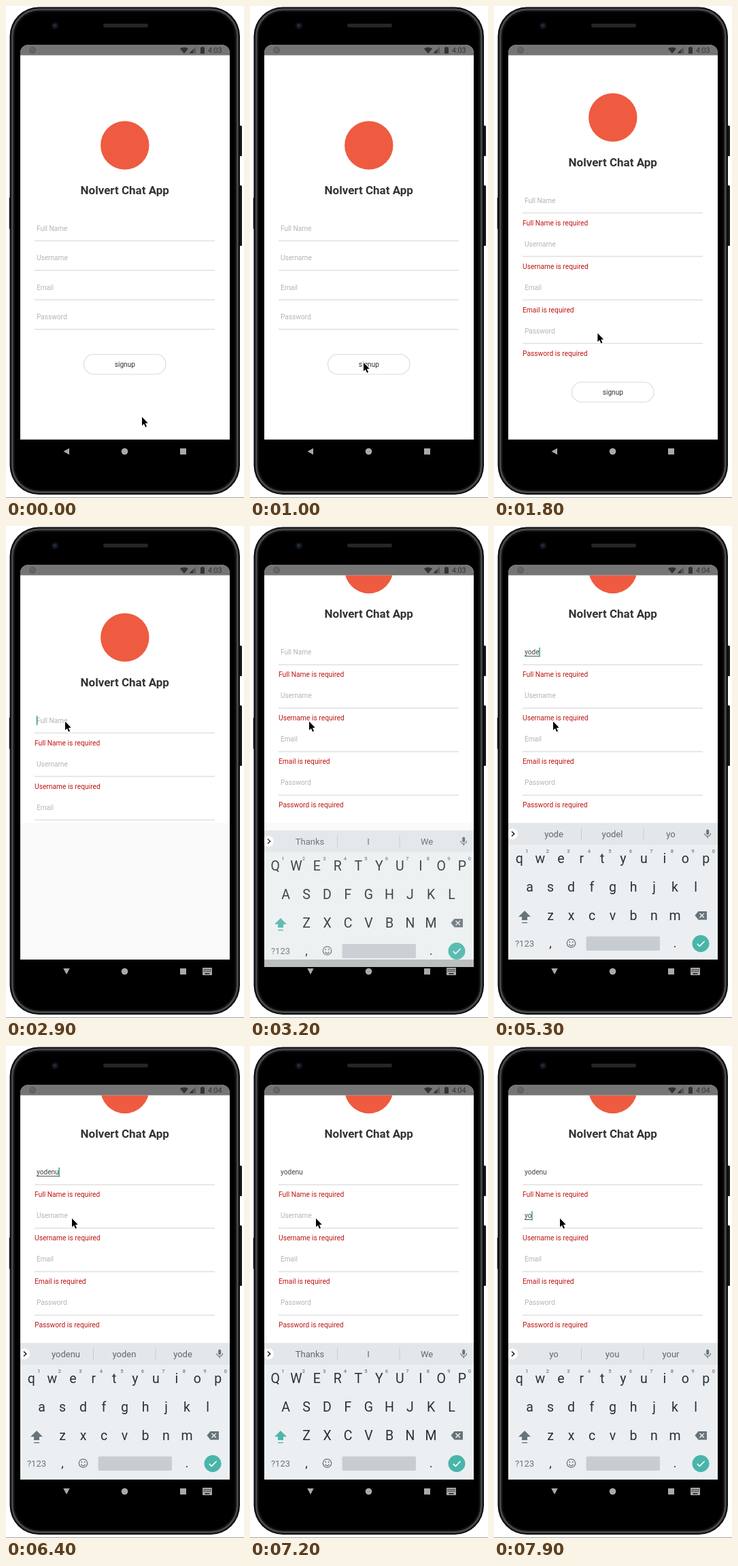
An HTML page with a canvas that plays this animation: 350 px wide and 724 px high, repeating every 8 s.

```html
<!DOCTYPE html>
<html lang="en">
<head>
<meta charset="utf-8">
<title>Sign-up form</title>
<style>
html, body { margin: 0; width: 100%; height: 100%; overflow: hidden; background: #fff; }
canvas { display: block; width: 350px; height: 724px; }
</style>
</head>
<body>
<canvas id="stage"></canvas>
<script>
const W = 350, H = 724, LOOP = 8000, STEP = 100;
const canvas = document.getElementById('stage');
const ratio = window.devicePixelRatio || 1;
canvas.width = W * ratio;
canvas.height = H * ratio;
const c = canvas.getContext('2d');
const FONT = 'Roboto, sans-serif';

const ERRORS_AT = 1200, FOCUS_AT = 2700, RESIZE_AT = 2900, NEXT_AT = 6600;
const BAR_END = 72.5;
const LABELS = ['Full Name', 'Username', 'Email', 'Password'];
const KEYS = ['qwertyuiop', 'asdfghjkl', 'zxcvbnm'];
const EMPTY = ['Thanks', 'I', 'We'];

// Each key press: time, field, value, suggestions
const TYPING = [
  [3800, 0, 'y', ['y', 'you', 'your']],
  [4000, 0, 'yo', ['yo', 'you', 'your']],
  [4700, 0, 'yod', ['yod', 'yo', 'you']],
  [5100, 0, 'yode', ['yode', 'yodel', 'yo']],
  [5500, 0, 'yoden', ['yoden', 'yodel', 'yode']],
  [5950, 0, 'yodenu', ['yodenu', 'yoden', 'yode']],
  [7400, 1, 'y', ['y', 'you', 'your']],
  [7700, 1, 'yo', ['yo', 'you', 'your']]
];

// Pointer path: time, x, y
const POINTER = [
  [0, 200, 604], [600, 167, 524], [1500, 167, 524],
  [2600, 87, 287], [5900, 87, 287], [6300, 97, 253]
];

const clamp = (v) => Math.max(0, Math.min(1, v));
const ramp = (t, a, b) => clamp((t - a) / (b - a));
const ease = (p) => p * p * (3 - 2 * p);

function text(str, x, y, size, color, align = 'left', weight = 400) {
  c.font = `${weight} ${size}px ${FONT}`;
  c.textAlign = align;
  c.fillStyle = color;
  c.fillText(str, x, y);
}

function rect(x, y, w, h, color) {
  c.fillStyle = color;
  c.fillRect(x, y, w, h);
}

function pill(x, y, w, h, r, fill, stroke, width = 1) {
  c.beginPath();
  c.roundRect(x, y, w, h, r);
  if (fill) { c.fillStyle = fill; c.fill(); }
  if (stroke) { c.strokeStyle = stroke; c.lineWidth = width; c.stroke(); }
}

function disc(x, y, r, color) {
  c.beginPath();
  c.arc(x, y, r, 0, Math.PI * 2);
  c.fillStyle = color;
  c.fill();
}

function trace(points) {
  c.beginPath();
  points.forEach(([x, y], i) => i ? c.lineTo(x, y) : c.moveTo(x, y));
}

function poly(points, color) {
  trace(points);
  c.closePath();
  c.fillStyle = color;
  c.fill();
}

function line(points, color, width) {
  trace(points);
  c.strokeStyle = color;
  c.lineWidth = width;
  c.stroke();
}

function phone() {
  rect(0, 0, W, H, '#fff');
  rect(0, 723, W, 1, '#a8a8a8');
  pill(341, 176, 6, 45, 1.5, '#141414');
  pill(341, 264, 6, 89, 1.5, '#141414');
  pill(4.7, 282, 4, 46, 1, '#141414');
  pill(5.5, 1.5, 338.5, 717.5, 43, '#0b0b0b');
  pill(9.3, 5, 331, 710.5, 39.5, null, '#464748', 3);
  pill(12.5, 8, 324.5, 704.5, 36.5, '#000', '#161616');
  disc(72, 29, 5.3, '#0d1015');
  disc(72, 29, 3, '#15202f');
  disc(71.5, 28.5, 1.3, '#2a4058');
  pill(143, 26, 66, 5.5, 2.75, '#262626');
}

function statusBar(t) {
  const ink = '#333';
  rect(21, 57, 308, BAR_END - 57, '#757575');
  disc(39, 65, 5, '#5c5c5c');
  disc(38.5, 64.5, 3.4, '#666');
  c.beginPath();
  c.moveTo(262, 70);
  c.lineTo(255.8, 62.8);
  c.quadraticCurveTo(262, 58.6, 268.2, 62.8);
  c.closePath();
  c.fillStyle = ink;
  c.fill();
  poly([[269.5, 69.5], [279, 69.5], [279, 60]], '#575757');
  poly([[269.5, 69.5], [275, 69.5], [275, 64]], ink);
  rect(286, 61, 6, 9, ink);
  rect(287.7, 60, 2.6, 1, ink);
  text(t < 5000 ? '4:03' : '4:04', 317.5, 69, 10.7, ink, 'right');
}

function field(i, y, state, t) {
  const value = state.values[i];
  if (value) text(value, 45, y + 3.6, 10.1, '#444');
  else text(LABELS[i], 45, y + 3.6, 10.1, '#b4b4b4');
  rect(42, y + 17.6, 265, 1.4, '#dedede');
  if (state.focus !== i) return;
  c.font = `400 10.1px ${FONT}`;
  const w = value ? c.measureText(value).width : 0;
  if (value) rect(45, y + 5.2, w, 1, '#555');
  if ((t - state.since) % 1000 < 500) rect(44.8 + w, y - 7, 1.4, 14, '#269c90');
}

function form(state, t) {
  const errors = t >= ERRORS_AT;
  const bottom = t >= RESIZE_AT ? 437 : 638;
  const scroll = 100.4 * ease(ramp(t, 2900, 3200));
  const pitch = errors ? 64 : 43.4;

  rect(21, 57, 308, 581, '#fafafa');
  c.save();
  c.beginPath();
  c.rect(21, BAR_END, 308, bottom - BAR_END);
  c.clip();
  rect(21, 57, 308, bottom - 57, '#fff');
  c.translate(0, (errors ? -41 : 0) - scroll);
  disc(174.8, 205, 35.7, '#ee5b40');
  text('Nolvert Chat App', 174.7, 276.6, 17, '#333', 'center', 700);
  LABELS.forEach((label, i) => {
    const y = 327.2 + i * pitch;
    field(i, y, state, t);
    if (errors) text(label + ' is required', 42, y + 36.5, 10.25, '#bd1612');
  });
  const y = errors ? 594.5 : 512.5;
  pill(114.5, y, 120.5, 29.5, 14.75, '#fff', '#dcdcdc', 1.2);
  text('signup', 174.8, y + 18.2, 10.1, '#333', 'center');
  c.restore();
}

function navBar(t) {
  const ink = '#a9a9a9';
  if (t < FOCUS_AT + 200) {
    poly([[84.5, 655.5], [93, 650.8], [93, 660.2]], ink);
  } else {
    poly([[84.3, 651], [93.7, 651], [89, 660]], ink);
    pill(289, 650, 14, 11, 1, ink);
    for (let row = 0; row < 2; row++)
      for (let i = 0; i < 5; i++) rect(290.6 + i * 2.4, 652 + row * 2.6, 1.3, 1.3, '#111');
    rect(292.5, 658, 7, 1.4, '#111');
  }
  disc(174.5, 655.5, 4.8, ink);
  rect(256, 651, 9, 9, ink);
}

function keyboard(state, t) {
  const shown = ramp(t, 3040, 3240);
  if (!shown) return;
  const ink = '#263238', soft = '#67737a';
  c.save();
  c.translate(0, 55 * (1 - shown));
  c.globalAlpha = shown;
  rect(21, 437, 308, 201, '#eceff1');
  rect(21, 437, 308, 32, '#e4e7e9');
  c.globalAlpha = Math.sqrt(shown);

  c.save();
  c.beginPath();
  c.rect(21, 437, 308, 32);
  c.clip();
  disc(27, 453, 8, '#fff');
  c.restore();
  line([[26, 449.5], [29.7, 453], [26, 456.5]], '#222', 1.6);
  state.words.forEach((word, i) => text(word, 88 + i * 86, 457.7, 13, '#5d6a71', 'center'));
  rect(128, 444, 1, 18, '#c6cbce');
  rect(219.5, 444, 1, 18, '#c6cbce');

  pill(312.2, 446.5, 4, 8, 2, soft);
  c.beginPath();
  c.arc(314.2, 452.3, 4.3, 0, Math.PI);
  c.strokeStyle = soft;
  c.lineWidth = 1.2;
  c.stroke();
  rect(313.6, 456.5, 1.2, 3, soft);

  KEYS.forEach((row, r) => [...row].forEach((key, i) => {
    const x = [37.3, 52.5, 83][r] + i * 30.5;
    const y = 496 + r * 42;
    text(state.caps ? key.toUpperCase() : key, x, y, 19.5, ink, 'center');
    if (r === 0) text((i + 1) % 10, x + 11, y - 14.8, 7.5, '#6f7b81', 'center', 500);
  }));

  const shift = state.caps ? '#4db6ac' : soft;
  poly([[45, 566], [54, 575], [49, 575], [49, 580], [41, 580], [41, 575], [36, 575]], shift);
  rect(41, 583, 8, 1.4, shift);

  poly([[295.5, 573], [300.5, 567], [313, 567], [313, 579.5], [300.5, 579.5]], soft);
  line([[302.5, 570], [309, 576.5]], '#eceff1', 1.5);
  line([[309, 570], [302.5, 576.5]], '#eceff1', 1.5);

  text('?123', 45, 619, 13, soft, 'center');
  text(',', 83, 620, 18, ink, 'center');
  text('.', 266, 620, 18, ink, 'center');
  c.beginPath();
  c.arc(113.5, 614, 6.2, 0, Math.PI * 2);
  c.strokeStyle = soft;
  c.lineWidth = 1.3;
  c.stroke();
  disc(111.3, 612.3, 1, soft);
  disc(115.7, 612.3, 1, soft);
  c.beginPath();
  c.arc(113.5, 614.7, 3, 0.2, Math.PI - 0.2);
  c.stroke();
  pill(135.5, 604, 108.5, 21, 2, '#c8cdd1');
  disc(304, 614.5, 12.5, '#4ab5aa');
  line([[298.8, 614.8], [302.4, 618.4], [309.6, 611]], '#fff', 1.7);
  c.restore();
}

function pointer(t) {
  let i = POINTER.length - 1;
  while (POINTER[i][0] > t) i--;
  const a = POINTER[i], b = POINTER[i + 1] || a;
  const p = a === b ? 0 : ease(ramp(t, a[0], b[0]));
  c.save();
  c.translate(a[1] + (b[1] - a[1]) * p, a[2] + (b[2] - a[2]) * p);
  trace([[0, 0.8], [0, 13.4], [2.9, 10.8], [5, 15.8], [7, 14.9], [4.9, 10.1], [8.7, 9.8]]);
  c.closePath();
  c.lineJoin = 'round';
  c.strokeStyle = '#fff';
  c.lineWidth = 2;
  c.stroke();
  c.fillStyle = '#000';
  c.fill();
  c.restore();
}

function stateAt(t) {
  const s = { values: [], focus: -1, since: 0, words: EMPTY, caps: true };
  if (t >= FOCUS_AT) Object.assign(s, { focus: 0, since: FOCUS_AT });
  for (const [at, i, value, words] of TYPING) {
    if (at > t) break;
    s.values[i] = value;
    Object.assign(s, { focus: i, since: at, words, caps: false });
  }
  if (t >= NEXT_AT && s.focus === 0)
    Object.assign(s, { focus: 1, since: NEXT_AT, words: EMPTY, caps: true });
  return s;
}

function draw(t) {
  const state = stateAt(t);
  c.setTransform(ratio, 0, 0, ratio, 0, 0);
  phone();
  c.save();
  c.beginPath();
  c.roundRect(21, 57, 308, 581, [12, 12, 0, 0]);
  c.clip();
  form(state, t);
  statusBar(t);
  c.restore();
  navBar(t);
  keyboard(state, t);
  pointer(t);
}

const start = performance.now();
function tick() {
  const t = (performance.now() - start) % LOOP;
  draw(Math.floor(t / STEP) * STEP);
  requestAnimationFrame(tick);
}
tick();
</script>
</body>
</html>
```
